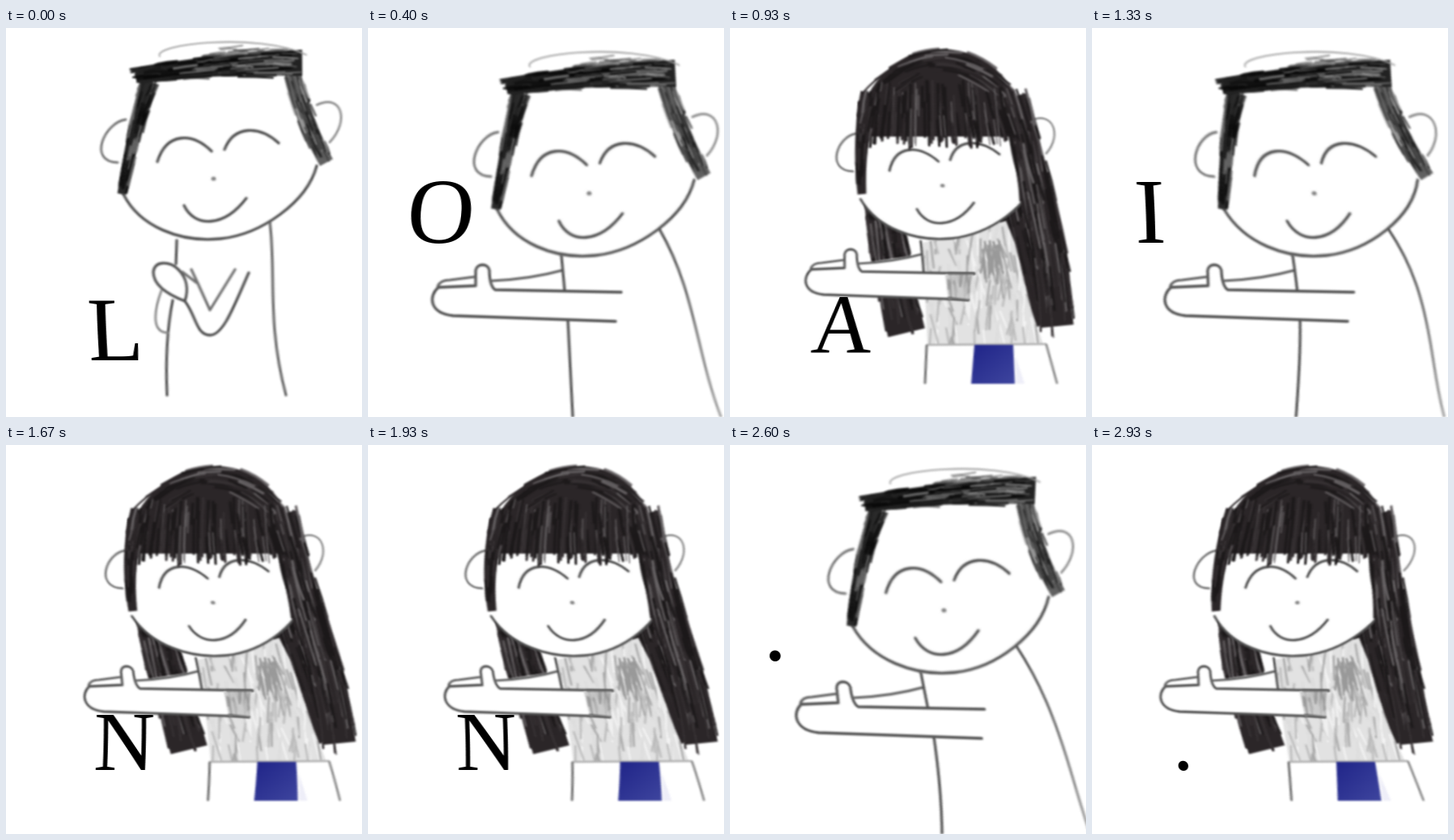
An HTML page with a canvas that plays this animation: 440x480 px, repeating every 2990 ms.

```html
<!DOCTYPE html>
<html lang="en">
<head>
<meta charset="utf-8">
<title>Loading</title>
<style>
html, body { margin: 0; width: 100%; height: 100%; overflow: hidden; background: #fff; }
canvas { display: block; }
</style>
</head>
<body>
<canvas id="stage" width="440" height="480"></canvas>
<script>
const W = 440, H = 480, PAD = 20, WIDE = W + 2 * PAD, LOOP = 2990, STEPS = 45;
const WORD = 'LOADING..';
const screen = document.getElementById('stage').getContext('2d');

let seed = 7;
function rnd(a, b) {
  seed = (seed * 16807) % 2147483647;
  return a + (b - a) * seed / 2147483647;
}

// Sideways sway of row y at a given step
function sway(y, step) {
  return 6.4 * Math.sin(2 * Math.PI * (y / 560 + 7 / 36 - step / STEPS));
}

function layer() {
  const c = document.createElement('canvas');
  c.width = WIDE;
  c.height = H;
  const g = c.getContext('2d');
  g.translate(PAD, 0);
  g.lineCap = g.lineJoin = 'round';
  return g;
}

function bend(g, src, step, sign) {
  for (let y = 0; y < H; y++) {
    g.drawImage(src, 0, y, WIDE, 1, sign * sway(y + 0.5, step) - PAD, y, WIDE, 1);
  }
}

// Draw as posed at a step, soften, then take the sway out
function straight(step, draw) {
  const sharp = layer(), soft = layer(), out = layer();
  draw(sharp);
  soft.filter = 'blur(0.8px)';
  soft.drawImage(sharp.canvas, -PAD, 0);
  bend(out, soft.canvas, step, -1);
  return out.canvas;
}

function stack(...parts) {
  const g = layer();
  for (const [art, sx = 1, sy = 1, x = 0, y = 0] of parts) {
    g.save();
    g.translate(x, y);
    g.scale(sx, sy);
    g.drawImage(art, -PAD, 0);
    g.restore();
  }
  return g.canvas;
}

function pen(g, path, color = '#505050', width = 3.3) {
  g.strokeStyle = color;
  g.lineWidth = width;
  g.stroke(new Path2D(path));
}

function fill(g, path, color) {
  g.fillStyle = color;
  g.fill(new Path2D(path));
}

// Shallow arch between two points
function bow(g, x0, y0, x1, y1, rise) {
  const w = x1 - x0, y = (y0 + y1) / 2 + rise;
  pen(g, `M${x0} ${y0}C${x0 + 0.17 * w} ${y} ${x1 - 0.36 * w} ${y} ${x1} ${y1}`);
}

// Crayon strokes along a curve, w0 to w1 wide on either side
function lock(g, [x0, y0, cx, cy, x1, y1], w0, w1, n, base, tones, width = 2) {
  const at = (t, s) => {
    const u = 1 - t;
    const dx = u * (cx - x0) + t * (x1 - cx), dy = u * (cy - y0) + t * (y1 - cy);
    const k = s * (w0 + (w1 - w0) * t) / Math.hypot(dx, dy);
    return [u * u * x0 + 2 * u * t * cx + t * t * x1 - dy * k,
      u * u * y0 + 2 * u * t * cy + t * t * y1 + dx * k];
  };
  if (base) {
    const edge = [];
    for (let t = 0; t <= 1; t += 0.1) {
      edge.unshift(at(t, -0.9));
      edge.push(at(t, 0.9));
    }
    fill(g, 'M' + edge.join('L') + 'Z', base);
  }
  for (let i = 0; i < n; i++) {
    const t = rnd(-0.03, 0.8), s = rnd(-1, 1), len = rnd(0.12, 0.25);
    const path = `M${at(t, s)}Q${at(t + len / 2, s + rnd(-0.1, 0.1))} ${at(t + len, s + rnd(-0.15, 0.15))}`;
    pen(g, path, tones[i % tones.length], rnd(0.6, 1.4) * width);
  }
}

// Near-vertical crayon strokes inside an outline
function hatch(g, path, n, [x0, y0, x1, y1], len, tones, width) {
  g.save();
  g.clip(new Path2D(path));
  for (let i = 0; i < n; i++) {
    const x = rnd(x0, x1), y = rnd(y0, y1);
    pen(g, `M${x} ${y}l${rnd(-0.2, 0.35) * len} ${rnd(0.6, 1.2) * len}`, tones[i % tones.length], width);
  }
  g.restore();
}

function drawFace(g) {
  const jaw = 'M145 205C165 245 215 265 265 260S372 215 384 170';
  fill(g, jaw + 'L350 50H175Z', '#fff');
  pen(g, jaw);
  pen(g, 'M148 113C122 116 100 165 138 166', '#707070', 2.8);
  pen(g, 'M384 95C415 80 425 115 400 141', '#888', 2.6);
  bow(g, 187, 165, 254, 152, -30);
  bow(g, 270, 150, 337, 142, -26);
  bow(g, 220, 219, 297, 210, 32);
  pen(g, 'M256 186h1', '#888', 5);
}

function boyHair(g) {
  const black = ['#111', '#222', '#0a0a0a', '#666'];
  lock(g, [178, 66, 160, 115, 143, 205], 13, 6, 60, '#2a2a2a', black);
  lock(g, [354, 58, 368, 115, 396, 166], 12, 10, 70, '#606060', ['#222', '#444', '#999', '#333']);
  lock(g, [160, 59, 250, 44, 366, 43], 10, 18, 110, '#222', black, 2.4);
  lock(g, [240, 42, 300, 32, 370, 38], 14, 14, 30, null, ['#555', '#888'], 1.4);
  pen(g, 'M190 35C180 20 310 5 371 33', '#a0a0a0', 1.8);
}

function clapBody(g) {
  pen(g, 'M211 262L210 291M206 336Q196 385 199 453');
  pen(g, 'M326 240C334 300 322 365 346 453', '#686868');
  pen(g, 'M182 301C184 286 203 288 213 298S226 322 221 337Q182 322 182 301Z');
  pen(g, 'M218 301L235 314M229 298L237 315L252 348L283 298', '#707070');
  pen(g, 'M221 337C235 355 235 379 252 379S282 342 300 302');
  pen(g, 'M192 324C186 340 176 376 200 376', '#888', 2.8);
}

function drawArm(g) {
  const arm = 'M313 326L157 323Q150 318 150 299C148 290 135 290 133 299V318L87 320C74 331 76 352 105 355L306 362';
  const wrist = 'M86 319Q89 311 101 311L132 307M152 312Q200 310 240 299';
  fill(g, arm, '#fff');
  fill(g, 'M152 312L240 299L243 324H157Z', '#fff');
  pen(g, arm);
  pen(g, wrist, '#606060', 3);
  pen(g, 'M239 281L243 324');
}

function reachBody(g) {
  const fade = g.createLinearGradient(0, 250, 0, 480);
  fade.addColorStop(0, '#505050');
  fade.addColorStop(1, '#a8a8a8');
  pen(g, 'M247 361L253 480');
  pen(g, 'M360 248C405 325 405 400 437 482', fade);
}

const brown = ['#1c191a', '#2b2628', '#353032', '#1c191a', '#676365'];

function girlBack(g) {
  lock(g, [176, 90, 183, 230, 218, 376], 20, 26, 150, '#2b2628', brown, 2.6);
  lock(g, [335, 150, 345, 230, 388, 366], 18, 18, 70, '#2b2628', brown, 2.6);

  const shirt = 'M238 265L341 238L352 265L373 350L387 390L244 391Z';
  fill(g, shirt, '#e2e2e2');
  hatch(g, shirt, 150, [238, 235, 380, 375], 32, ['#bbb', '#f4f4f4', '#a8a8a8', '#ddd'], 2.4);
  hatch(g, shirt, 25, [310, 262, 335, 290], 24, ['#999'], 2.4);

  pen(g, 'M244 391L390 390', '#b0b0b0', 2.4);
  pen(g, 'M243 392L241 438', '#666', 2.8);
  pen(g, 'M391 391L404 438', '#858585', 2.8);
  const blue = g.createLinearGradient(310, 390, 350, 440);
  blue.addColorStop(0, '#22278a');
  blue.addColorStop(1, '#3e459e');
  fill(g, 'M302 391H350L352 439H298Z', blue);
  fill(g, 'M353 405L364 439H354Z', '#eeeef8');
}

function girlFront(g) {
  fill(g, 'M158 134A104 108 0 0 1 366 134Z', '#2b2628');
  lock(g, [350, 85, 388, 210, 404, 368], 18, 23, 190, '#2b2628', brown, 2.6);
  lock(g, [172, 80, 158, 140, 163, 205], 12, 6, 40, '#2b2628', brown, 2.4);
  lock(g, [172, 86, 262, -6, 352, 86], 16, 16, 70, null, brown, 2.2);
  // fringe falls away from the parting
  for (let i = 0; i < 130; i++) {
    const x = rnd(170, 350), y = rnd(65, 120), end = i % 2 ? rnd(126, 149) : y + 25;
    pen(g, `M${x} ${y}L${x + (x - 235) * 0.08} ${end}`, brown[i % 5], i % 5 < 4 ? 3 : 1.4);
  }
}

function girlCuff(g) {
  const cuff = 'M266 304H301L296 335H270Z';
  fill(g, cuff, '#ccc');
  hatch(g, cuff, 20, [266, 300, 300, 320], 18, ['#999', '#bbb'], 2);
  pen(g, 'M270 303H302M270 333L295 336', '#606060', 2.4);
}

const face = straight(0, drawFace), hair = straight(0, boyHair), arm = straight(6, drawArm);
const nod = [1.02, 1.035, 7.6, 11.5];

const poses = [
  { art: stack([straight(0, clapBody)], [face], [hair]), x: 105.5, y: 410, size: 112 },
  { art: stack([straight(6, reachBody)], [arm], [face, ...nod], [hair, ...nod]), x: 47.5, y: 264.5, size: 115 },
  {
    art: stack([straight(14, girlBack)], [face, 0.92, 0.88, 19.3, 30.8], [straight(14, girlFront)],
      [arm, 0.89, 0.89, 15.6, 13], [straight(14, girlCuff)]),
    x: 102.8, y: 400.5, size: 104
  }
];

const buffer = layer();
let shown = -1;

function render(step) {
  const n = Math.floor(step / 5), pose = poses[n % 3];
  buffer.clearRect(-PAD, 0, WIDE, H);
  buffer.drawImage(pose.art, -PAD, 0);
  buffer.font = pose.size + 'px "Liberation Serif", "Times New Roman", serif';
  buffer.fillText(WORD[n], pose.x, pose.y);
  screen.fillStyle = '#fff';
  screen.fillRect(0, 0, W, H);
  bend(screen, buffer.canvas, step, 1);
}

// Fifteen steps a second, each starting on a whole hundredth
function stepAt(t) {
  let i = Math.floor(t * 0.015) + 1;
  while (Math.round(i * 20 / 3) * 10 > t) i--;
  return Math.min(i, STEPS - 1);
}

function tick() {
  const step = stepAt(performance.now() % LOOP);
  if (step !== shown) render(shown = step);
  requestAnimationFrame(tick);
}
tick();
</script>
</body>
</html>
```
